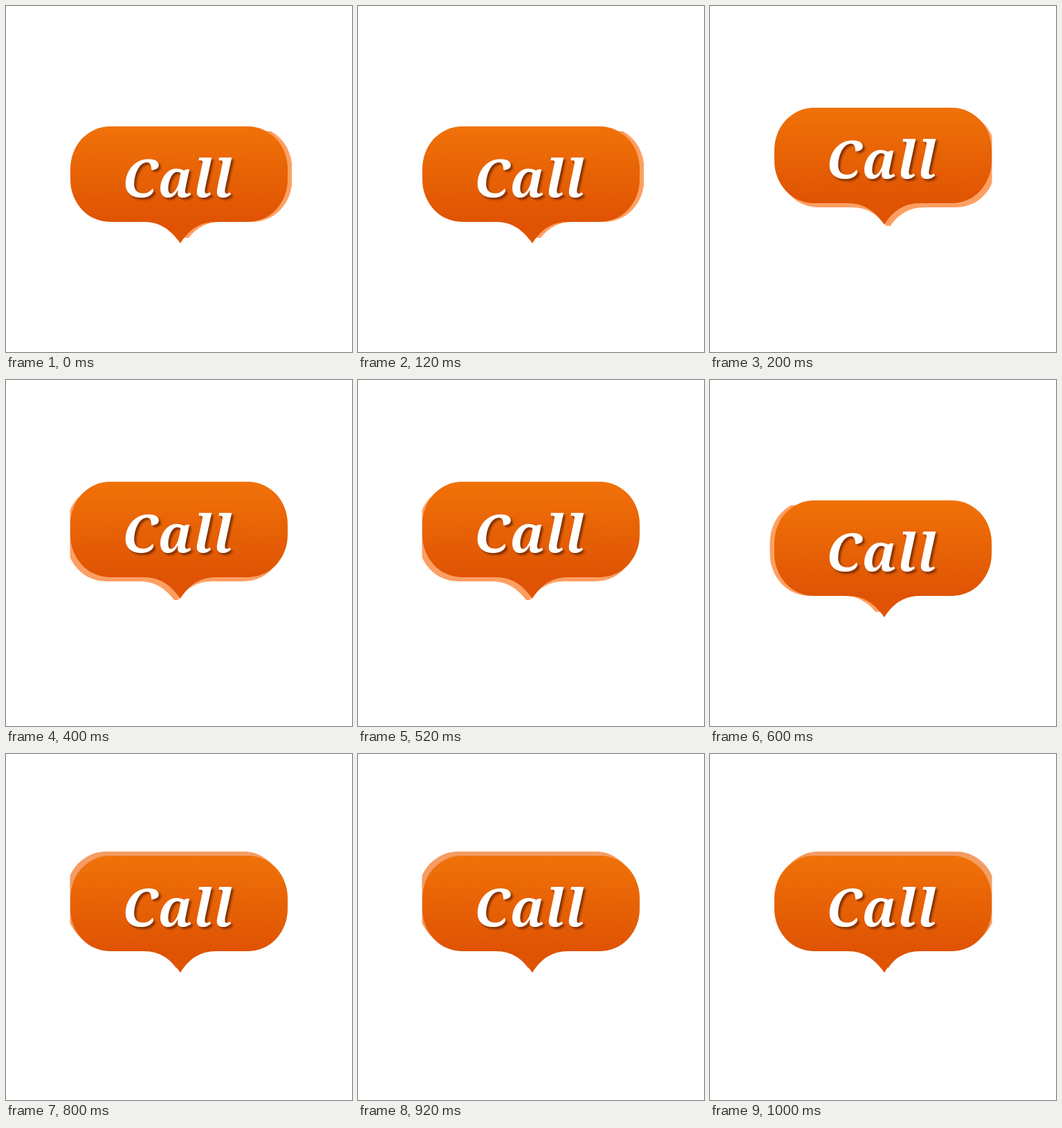
Animation, 500 px wide and 500 px high, one loop 1200 ms. Source, as an HTML page:

```html
<!DOCTYPE html>
<html lang="en">
<head>
<meta charset="utf-8">
<title>Call bubble</title>
<style>
html, body { margin: 0; width: 100%; height: 100%; overflow: hidden; background: #fff; }
svg { display: block; width: 100vw; height: 100vh; }
text {
  font: italic bold 75px "Noto Serif", serif;
  fill: #fff;
  text-shadow: 3px 3px 3px rgba(90, 30, 0, .7);
}
</style>
</head>
<body>
<svg viewBox="0 0 500 500">
  <defs>
    <linearGradient id="fill" gradientUnits="userSpaceOnUse" x1="0" y1="174" x2="0" y2="312">
      <stop offset="0" stop-color="#f07208"/>
      <stop offset="1" stop-color="#df5303"/>
    </linearGradient>
    <path id="bubble" d="M150 174H350A57 61 0 0 1 407 235V251A57 61 0 0 1 350 312H303
      C281 312 264 323 252 343C238 323 222 312 200 312H150A57 61 0 0 1 93 251V235A57 61 0 0 1 150 174Z"/>
    <clipPath id="wide"><rect x="86" y="181" width="327" height="154"/></clipPath>
    <clipPath id="tall"><rect x="92.5" y="141" width="315" height="177"/></clipPath>
  </defs>
  <g id="frame"><use id="echo" href="#bubble" fill="#fd9f62"/></g>
  <g id="body">
    <use href="#bubble" fill="url(#fill)"/>
    <text x="168 220 272 301" y="275.5">Call</text>
  </g>
</svg>
<script>
const STEP = 200;
const LIFT = -27;
// Echo offset per step; the bubble rests low when the echo is purely sideways.
const poses = [[6.5, 0], [6, 6], [-6, 6], [-6.5, 0], [-6, -6], [6, -6]];
const get = id => document.getElementById(id);
const move = (id, x, y) => get(id).setAttribute("transform", `translate(${x} ${y})`);

function draw(now) {
  const [dx, dy] = poses[Math.floor(now / STEP) % poses.length];
  const lift = dy ? LIFT : 0;
  move("body", 0, lift);
  move("echo", dx, dy + lift);
  get("echo").setAttribute("fill", dy < 0 ? "#f49c63" : "#fd9f62");
  get("frame").setAttribute("clip-path", `url(#${dy ? "tall" : "wide"})`);
}

const start = performance.now();
function tick() {
  draw(performance.now() - start);
  requestAnimationFrame(tick);
}
tick();
</script>
</body>
</html>
```
